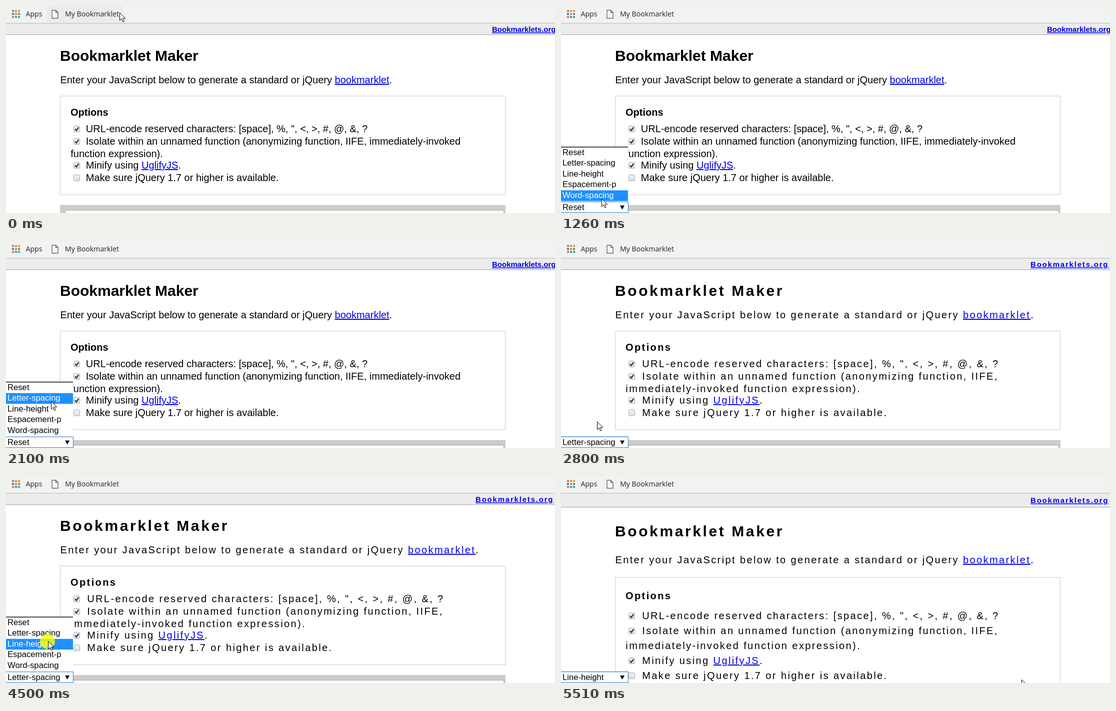
Recreate the animation shown at these times as an HTML page. Size 1098 by 415 pixels, loop 5.58 s.

```html
<!DOCTYPE html>
<html lang="en">
<head>
<meta charset="utf-8">
<title>Text spacing bookmarklet</title>
<style>
html, body { margin: 0; width: 100%; height: 100%; overflow: hidden; background: #fff; }
svg { display: block; width: 1098px; height: 415px; }
text { font: 20px "Liberation Sans", Arial, sans-serif; white-space: pre; }
.h1 { font-size: 30px; font-weight: bold; }
.h2 { font-weight: bold; }
.site { font-size: 15px; font-weight: bold; }
.spaced text { letter-spacing: .12em; }
.link { fill: #00e; text-decoration: underline; }
.bar text { font: 14.15px "Open Sans", sans-serif; fill: #222; }
.widget text { font-size: 16.67px; }
</style>
</head>
<body>
<svg id="stage" viewBox="0 0 1098 415"></svg>
<script>
const LOOP = 5580;
const OPTIONS = ['Reset', 'Letter-spacing', 'Line-height', 'Espacement-p', 'Word-spacing'];
const ROW = 21.5, MENU_TOP = 283.5;

// Cursor tip: [step, x, y]
const PATH = [
  [-1, 227, 13], [1, 205, 60], [4, 130, 250], [6, 82, 390], [7, 75, 404], [9, 74, 402],
  [10, 74, 402], [12, 75, 400], [15, 81, 386], [18, 88, 346], [21, 91, 332], [26, 90, 321],
  [32, 90, 321], [35, 72, 362], [40, 65, 403], [45, 65, 403], [48, 74, 362], [51, 83, 329],
  [52, 84, 331], [60, 84, 331], [64, 420, 368], [68, 817, 403], [70, 921, 408]
];

// Vertical positions for the normal and the taller line height
const NORMAL = { band: 57, site: 52, h1: 110, intro: 155, box: 180, boxEnd: 379, h2: 220,
  items: [253, 278, 303, 326, 351] };
const TALL = { band: 62, site: 54, h1: 121, intro: 175, box: 203, boxEnd: 440, h2: 247,
  items: [287, 317, 347, 377, 407] };

const rect = (x, y, w, h, fill, extra = '') =>
  `<rect x="${x}" y="${y}" width="${w}" height="${h}" fill="${fill}" ${extra}/>`;
const text = (x, y, content, cls = '') => `<text x="${x}" y="${y}" class="${cls}">${content}</text>`;
const link = label => `<tspan class="link">${label}</tspan>`;

function checkbox(baseline, checked) {
  const y = baseline - 13;
  return rect(135.5, y + .5, 12, 12, 'url(#box)', 'rx="2" stroke="#a9a9a9"') +
    (checked ? `<path d="M138 ${y + 6.5}l2.7 3 4.6-6.5" fill="none" stroke="#3b3540" stroke-width="2.4"/>` : '');
}

function page(id, spaced, at) {
  const [url, isolate, wrapped, minify, jquery] = at.items;
  const x = spaced ? 162.2 : 159.8;
  const breakWord = 'immediately-invoked';
  return `<g id="${id}" class="${spaced ? 'spaced' : ''}">` +
    rect(0, 35, 1098, at.band - 35, '#ececec') + rect(0, at.band, 1098, 1, '#a0a0a0') +
    text(spaced ? 939 : 972, at.site, link('Bookmarklets.org'), 'site') +
    text(108, at.h1, 'Bookmarklet Maker', 'h1') +
    text(108.4, at.intro, `Enter your JavaScript below to generate a standard or jQuery ${link('bookmarklet')}.`) +
    rect(108.5, at.box + .5, 890, at.boxEnd - at.box - 1, 'none', 'stroke="#ccc"') +
    text(129, at.h2, 'Options', 'h2') +
    text(x, url, 'URL-encode reserved characters: [space], %, ", &lt;, &gt;, #, @, &amp;, ?') +
    text(x, isolate, 'Isolate within an unnamed function (anonymizing function, IIFE,' + (spaced ? '' : ' ' + breakWord)) +
    text(129.3, wrapped, (spaced ? breakWord + ' ' : '') + 'function expression).') +
    text(x, minify, `Minify using ${link('UglifyJS')}.`) +
    text(x, jquery, 'Make sure jQuery 1.7 or higher is available.') +
    [url, isolate, minify].map(y => checkbox(y, true)).join('') + checkbox(jquery, false) +
    rect(108, at.boxEnd + 20, 891, 60, '#ccc') +
    rect(118.5, at.boxEnd + 30.5, 877, 60, '#fff', 'stroke="#a9a9a9"') + '</g>';
}

function toolbar() {
  const colors = ['#e0703a', '#e0903a', '#dd9a3a', '#3f7fd0', '#e0893a', '#4a90d9', '#e07a3a', '#4a90d9', '#4fa860'];
  const dots = colors.map((c, i) => rect(12 + i % 3 * 6, 8 + Math.floor(i / 3) * 6, 4, 4, c)).join('');
  return '<g class="bar">' + rect(0, 0, 1098, 34, '#f1f3f2') + rect(0, 34, 1098, 1, '#b6b6b6') +
    rect(81, 0, 154, 33, '#ebeceb', 'id="hover"') + dots +
    '<path d="M92 8.5h7.5l4.5 4.5v11.5h-12zM99.5 8.5v4.5h4.5" fill="#fafafa" stroke="#666" stroke-width="1.4"/>' +
    text(39.5, 21, 'Apps') + text(118, 21, 'My Bookmarklet') + '</g>';
}

function widget() {
  const rows = OPTIONS.map((label, i) => text(3, Math.round(298.7 + i * ROW), label, 'row')).join('');
  return '<g id="select" class="widget">' +
    rect(-2.5, 392.5, 137, 22, '#fff', 'rx="1" stroke="#4b8fd8" stroke-width="1.3"') +
    text(3, 409, '', 'value') + '<path d="M118 400h9l-4.5 8z"/></g>' +
    '<g id="menu" class="widget">' + rect(0, 282, 134, 110, '#fff') + rect(0, 282, 134, 1.5, '#111') +
    rect(0, 0, 134, ROW, '#1e90ff', 'id="highlight"') + rows + '</g>';
}

const stage = document.getElementById('stage');
stage.innerHTML =
  '<defs><linearGradient id="box" x2="0" y2="1"><stop stop-color="#f4f4f4"/><stop offset="1" stop-color="#dedede"/></linearGradient></defs>' +
  page('page0', false, NORMAL) + page('page1', true, NORMAL) + page('page2', true, TALL) +
  toolbar() + widget() +
  '<circle id="click" cx="83" cy="332" r="15" fill="#ff0" opacity=".8"/>' +
  '<path id="cursor" d="M.5.5v15.7l3.7-3.5 2.5 5.9 2.5-1-2.5-5.8h5z" fill="#fff" stroke="#000"/>';

const find = selector => stage.querySelector(selector);
const show = (selector, visible) => { find(selector).style.display = visible ? '' : 'none'; };
const rowTexts = stage.querySelectorAll('.row');

function cursorAt(step) {
  const next = Math.max(1, PATH.findIndex(p => p[0] >= step));
  const [a, b] = [PATH[next - 1], PATH[next]];
  const k = (step - a[0]) / (b[0] - a[0]);
  return [1, 2].map(i => Math.round(a[i] + (b[i] - a[i]) * k));
}

function draw(time) {
  const step = Math.min(70, Math.max(-1, Math.floor((time - 85) / 77.2)));
  const [x, y] = cursorAt(step);
  const mode = step < 27 ? 0 : step < 58 ? 1 : 2;
  const overMenu = y >= MENU_TOP && y < MENU_TOP + ROW * OPTIONS.length;
  const active = overMenu ? Math.floor((y - MENU_TOP) / ROW) : mode;

  for (let i = 0; i < 3; i++) show('#page' + i, i === mode);
  show('#hover', y < 33);
  show('#select', step >= 0);
  show('#menu', step >= 11 && step < 27 || step >= 44 && step < 58);
  show('#click', step === 57);
  find('.value').textContent = OPTIONS[mode];
  find('#highlight').setAttribute('y', MENU_TOP + active * ROW);
  rowTexts.forEach((row, i) => row.setAttribute('fill', i === active ? '#fff' : '#000'));
  find('#cursor').setAttribute('transform', `translate(${x} ${y})`);
}

const start = performance.now();
function tick() {
  draw((performance.now() - start) % LOOP);
  requestAnimationFrame(tick);
}
tick();
</script>
</body>
</html>
```
